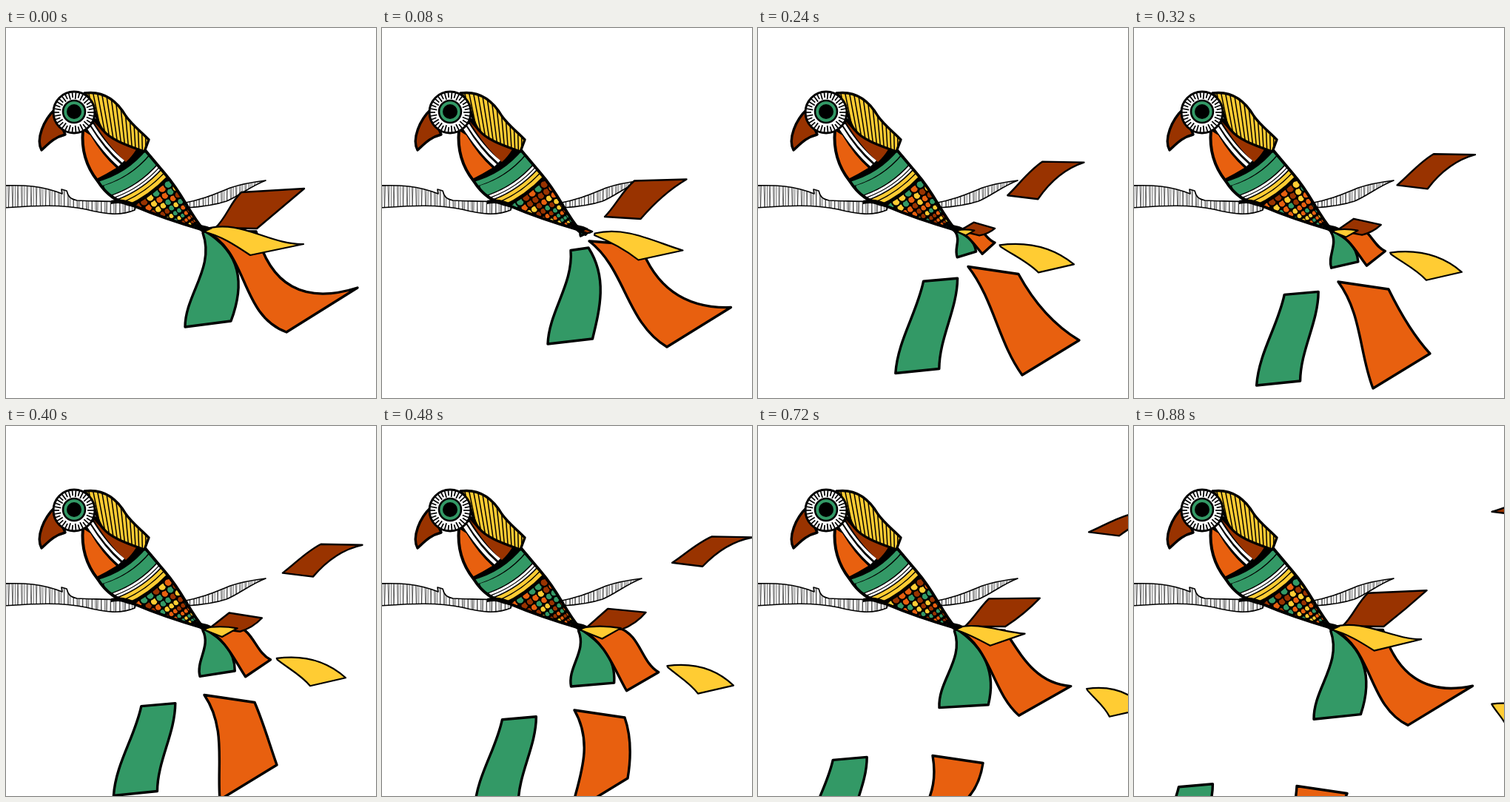
An HTML page with a canvas for the animation above (0.96 s loop, 500 by 500 pixels).

```html
<!DOCTYPE html>
<html lang="en">
<head>
<meta charset="utf-8">
<title>Bird shedding its tail</title>
<style>
html, body { margin: 0; height: 100%; overflow: hidden; background: #fff; }
canvas { display: block; width: 100%; height: 100%; }
</style>
</head>
<body>
<canvas width="500" height="500"></canvas>
<script>
const ctx = document.querySelector('canvas').getContext('2d');
const BROWN = '#993300', GREEN = '#339966', ORANGE = '#e8600f', YELLOW = '#ffcc33';
const STEP = 80, STEPS = 12;
const ROOT = [267, 274];

// A feather grows for one loop (age 0-12) and drifts away during the next (12-24).
// Pose: root, tip, tip, root corners, then two bends for each of the long sides.
// fold: degrees per step by which a young feather is still turned in.
// drift: speed of the root edge and of the tip edge once loose; curl: bend per step.
const HALF = 7, FULL = 12, LOOSE = 14;
const FEATHERS = [
  { color: GREEN, line: 3.4, fold: -4, ease: 1, curl: 0, drift: [-20.4, 18.2, -20.2, 16.5],
    half: [265, 277, 247, 365, 316, 364, 268, 274, 18, -10, 15, 25],
    full: [266, 277, 242, 404, 304, 396, 268, 274, 25, -8, 40, 32],
    loose: [244, 324, 206, 450, 265, 444, 290, 320, 4, -10, 8, -8] },
  { color: ORANGE, line: 3.4, fold: -4, ease: 1, curl: 6, drift: [-8, 20.5, -34, 18],
    half: [268, 274, 335, 378, 388, 352, 330, 277, 20, 5, 18, -10],
    full: [268, 274, 379, 411, 475, 351, 338, 275, 30, -35, -55, -55],
    loose: [292, 302, 391, 451, 468, 404, 360, 312, 5, -15, -16, -18] },
  { color: BROWN, line: 2.4, fold: 3.5, ease: 0.7, curl: 0, drift: [18.3, -13.8, 20.5, -10.4],
    half: [278, 271, 308, 241, 366, 243, 331, 271, 0, 0, -4, -4],
    full: [283, 270, 318, 222, 403, 217, 339, 271, -4, 4, 0, 0],
    loose: [319, 240, 364, 191, 420, 192, 360, 245, 0, 4, 8, 10] },
  { color: YELLOW, line: 2.2, fold: 0, ease: 1, curl: 0, drift: [19.6, 10.3, 16, 10.4],
    half: [266, 273, 333, 273, 303, 290, 266, 275, 4, 4, 0, 0],
    full: [268, 272, 402, 292, 330, 307, 266, 275, 22, -8, 6, 3],
    loose: [307, 283, 411, 309, 363, 320, 308, 285, 14, 16, 0, 4] }
];

const BODY = new Path2D('M104 138C101 170 112 192 124 207C136 226 150 235 172 240C205 254 235 264 267 273' +
  'C246 248 240 226 214 196L187 164L120 124Z');
const BRANCHES = [
  'M-4 213C25 212 48 213 76 224L75 218L82 220C84 227 86 231 96 233C120 235 150 232 176 239L174 246C155 254 135 252 108 245C75 238 40 240 -4 243Z',
  'M238 237C270 231 285 223 303 216C320 210 335 208 351 206C330 214 315 227 298 234C280 240 260 242 244 243Z'
].map(d => new Path2D(d));
const HOOD = new Path2D('M106 88C135 84 152 102 162 119C171 132 185 142 193 151L187 167C168 160 142 152 131 138C120 126 122 102 106 88Z');

function paint(path, fill, line) {
  ctx.fillStyle = fill;
  ctx.fill(path);
  if (!line) return;
  ctx.strokeStyle = '#000';
  ctx.lineWidth = line;
  ctx.stroke(path);
}

function clipped(path, draw) {
  ctx.save();
  ctx.clip(path);
  draw();
  ctx.restore();
}

function segment(x1, y1, x2, y2, width) {
  ctx.beginPath();
  ctx.moveTo(x1, y1);
  ctx.lineTo(x2, y2);
  ctx.strokeStyle = '#000';
  ctx.lineWidth = width;
  ctx.stroke();
}

function disc(x, y, r, fill, line) {
  const path = new Path2D();
  path.arc(x, y, r, 0, 7);
  paint(path, fill, line);
}

const mix = (a, b, u) => a.map((v, i) => v + (b[i] - v) * u);

// The half-grown pose, shrunk towards the root and folded in.
function young({ half, fold, ease }, age) {
  const size = Math.max(0.05, (age - 0.5) / (HALF - 0.5)) ** ease;
  const turn = fold * (HALF - age) * Math.PI / 180;
  const c = Math.cos(turn) * size, s = Math.sin(turn) * size;
  const pose = half.map(v => v * size);
  for (let i = 0; i < 8; i += 2) {
    const x = half[i] - ROOT[0], y = half[i + 1] - ROOT[1];
    pose[i] = ROOT[0] + x * c - y * s;
    pose[i + 1] = ROOT[1] + x * s + y * c;
  }
  return pose;
}

function poseAt(f, age) {
  if (age < HALF) return young(f, age);
  if (age < FULL) return mix(f.half, f.full, (age - HALF) / (FULL - HALF));
  if (age < LOOSE) return mix(f.full, f.loose, (age - FULL) / (LOOSE - FULL));
  const [rx, ry, tx, ty] = f.drift, bend = f.curl;
  const speed = [rx, ry, tx, ty, tx, ty, rx, ry, bend, bend, bend, bend];
  return f.loose.map((v, i) => v + speed[i] * (age - LOOSE));
}

// Control points on a straight side, pushed sideways by the two bends.
function sideControls(x1, y1, x2, y2, near, far) {
  const dx = x2 - x1, dy = y2 - y1, len = Math.hypot(dx, dy) || 1;
  const at = (u, bend) => [x1 + dx * u + dy / len * bend, y1 + dy * u - dx / len * bend];
  return [at(1 / 3, near), at(2 / 3, far)];
}

function drawFeather(f, age) {
  const [ax, ay, bx, by, cx, cy, dx, dy, l1, l2, r1, r2] = poseAt(f, age);
  const left = sideControls(ax, ay, bx, by, l1, l2);
  const right = sideControls(dx, dy, cx, cy, r1, r2).reverse();
  const path = new Path2D();
  path.moveTo(ax, ay);
  path.bezierCurveTo(...left.flat(), bx, by);
  path.lineTo(cx, cy);
  path.bezierCurveTo(...right.flat(), dx, dy);
  path.closePath();
  paint(path, f.color, f.line);
}

function drawBranch() {
  for (const path of BRANCHES) {
    paint(path, '#fff');
    clipped(path, () => {
      for (let x = 0; x < 352; x += 2.5) segment(x, 200, x + Math.sin(x) * 2, 256, 0.6);
    });
    paint(path, 'transparent', 1.6);
  }
}

// Stripe across the body; depth runs from chest (0) to scales (51).
function band(depth, width, color) {
  const t = (depth + width / 2) / 51, bow = 1.6 - t;
  ctx.beginPath();
  ctx.moveTo(116 + 48 * t, 208 + 32 * t);
  ctx.quadraticCurveTo(153 + 38 * t + 5 * bow, 185 + 36 * t + 8 * bow, 190 + 28 * t, 161 + 40 * t);
  ctx.strokeStyle = color;
  ctx.lineWidth = width;
  ctx.stroke();
}

// Overlapping scales that shrink towards the tail and change colour every step.
function drawScales(step) {
  const palette = [BROWN, GREEN, ORANGE, YELLOW];
  for (let row = 10; row >= 0; row--) {
    const u = 1 - (1 - row / 11) ** 1.3, size = 1 - u * 0.75;
    const cx = 190 + 76 * u, cy = 220 + 52 * u;
    for (let i = -4; i < 5; i++) {
      const across = (i + 0.5 * (row % 2)) * 11 * size;
      const noise = Math.abs(Math.sin(row * 12.9 + i * 78.2 + step * 37.7) * 437.5) % 1;
      disc(cx + across * 0.81, cy - across * 0.59, 6.2 * size, palette[Math.floor(noise * 4)], 2.2 * size);
    }
  }
}

function drawBody(step) {
  paint(BODY, '#000');
  clipped(BODY, () => {
    paint(new Path2D('M100 136L114 145Q130 172 149 189Q136 197 122 204Q100 185 100 136Z'), ORANGE);
    paint(new Path2D('M117 124Q135 150 176 164Q170 174 162 181Q138 160 117 124Z'), BROWN);
    paint(new Path2D('M107 132Q131 169 152 187L155 184Q133 165 113 132Z'), '#fff');
    paint(new Path2D('M114 130Q134 162 157 182L160 179Q138 162 118 130Z'), '#fff');
    drawScales(step);
    band(0, 53, '#000');
    band(3, 6.5, GREEN);
    band(12, 15, GREEN);
    band(29.5, 3, '#fff');
    band(34, 2.5, '#fff');
    band(38.5, 4.5, YELLOW);
    band(45, 5, YELLOW);
  });
  paint(BODY, 'transparent', 4);
  paint(new Path2D('M142 233Q158 228 178 239L168 240Q154 235 142 238Z'), '#000');
  paint(new Path2D('M250 263L272 268L279 271L266 277Z'), '#000');
}

function drawHead() {
  paint(HOOD, YELLOW);
  clipped(HOOD, () => {
    for (let i = 0; i < 16; i++) {
      const x = 104 + i * 6;
      segment(x, 80, x + 22 - i * 1.5, 172, 1.5);
    }
  });
  paint(HOOD, 'transparent', 3.4);
  paint(new Path2D('M66 110C51 124 40 150 48 165C57 157 64 148 80 144Z'), BROWN, 3.4);
  disc(92, 114, 28, '#fff', 3);
  for (let i = 0; i < 34; i++) {
    const a = i / 34 * Math.PI * 2, c = Math.cos(a), s = Math.sin(a), r = 18 + i % 2 * 2;
    segment(92 + c * r, 114 + s * r, 92 + c * 27, 114 + s * 27, 1.7);
  }
  disc(92, 113, 15, GREEN, 2.6);
  disc(92, 113, 10, '#000');
}

function frame(now) {
  const step = Math.floor(now / STEP) % STEPS;
  ctx.fillStyle = '#fff';
  ctx.fillRect(0, 0, 500, 500);
  ctx.lineJoin = 'round';
  drawBranch();
  for (const f of FEATHERS) drawFeather(f, step + STEPS);
  if (step) for (const f of FEATHERS) drawFeather(f, step);
  drawBody(step);
  drawHead();
  requestAnimationFrame(frame);
}
requestAnimationFrame(frame);
</script>
</body>
</html>
```
